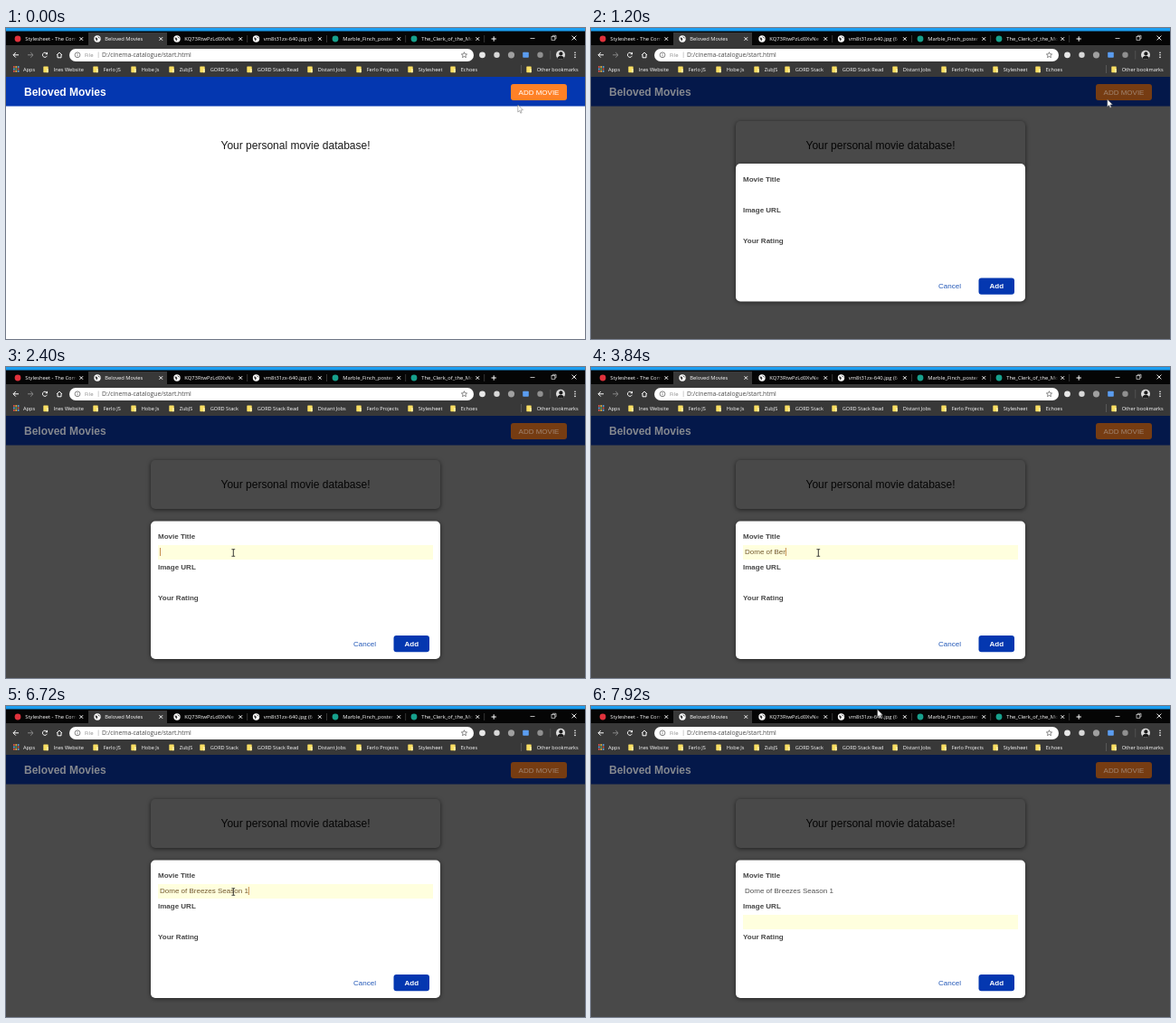
Write an HTML page with a canvas that moves like this. It is 640 px wide and 344 px high and loops after 8000 ms.

```html
<!DOCTYPE html>
<html lang="en">
<head>
<meta charset="utf-8">
<title>Beloved Movies</title>
<style>
  html, body { margin: 0; width: 100%; height: 100%; overflow: hidden; background: #fff; }
  canvas { display: block; width: 100vw; height: 100vh; }
</style>
</head>
<body>
<canvas id="stage" width="640" height="344"></canvas>
<script>
const ctx = document.getElementById('stage').getContext('2d');
const LOOP = 8000, STEP = 80;
const SANS = '"Liberation Sans", Arial, sans-serif';
const UI = '"Open Sans", "Noto Sans", sans-serif';
const CHROME = '#383838';

const MODAL_AT = 1200, FOCUS_AT = 2000, NEXT_FIELD_AT = 7120;

// "<" is the backspace key
const KEYS = 'Dome of Berzee<<<<<reezes Season 1';
const KEY_TIMES = [
  2640, 2800, 2880, 3040, 3120, 3200, 3360, 3440,
  3600, 3680, 3840, 3920, 4080, 4160,
  4400, 4560, 4720, 4720, 4800,
  4960, 5040, 5120, 5200, 5280, 5520, 5600, 5840,
  6080, 6160, 6240, 6400, 6480, 6560, 6720
];

const TABS = [
  [13, 'Stylesheet - The Com', '#e0323c'],
  [101, 'Beloved Movies', 'globe'],
  [189, 'KQ73RtwPzLd0XvNe', 'globe'],
  [276.5, 'vm8t31zx-640.jpg (6', 'globe'],
  [364, 'Marble_Finch_poster', '#17a08c'],
  [451, 'The_Clerk_of_the_Moor', '#17a08c']
];

const BOOKMARKS = [
  [44, 'Ines Website'], [99, 'Ferlo JS'], [141, 'Hobe Js'], [183, 'ZubJS'],
  [217, 'GORD Stack'], [269, 'GORD Stack Read'], [336, 'Distant Jobs'],
  [390, 'Ferlo Projects'], [447, 'Stylesheet'], [494, 'Echoes'],
  [578, 'Other bookmarks']
];

const clamp = v => Math.max(0, Math.min(1, v));
const progress = (t, a, b) => clamp((t - a) / (b - a));
const smooth = p => p * p * (3 - 2 * p);
const mix = (a, b, p) => a + (b - a) * p;

function rect(x, y, w, h, color) {
  ctx.fillStyle = color;
  ctx.fillRect(x, y, w, h);
}

function box(x, y, w, h, r, color) {
  ctx.fillStyle = color;
  ctx.beginPath();
  ctx.roundRect(x, y, w, h, r);
  ctx.fill();
}

function disc(x, y, r, color) {
  ctx.fillStyle = color;
  ctx.beginPath();
  ctx.arc(x, y, r, 0, 7);
  ctx.fill();
}

function trace(points, closed) {
  ctx.beginPath();
  points.forEach(([x, y]) => ctx.lineTo(x, y));
  if (closed) ctx.closePath();
}

function line(points, color, width = 1) {
  trace(points);
  ctx.strokeStyle = color;
  ctx.lineWidth = width;
  ctx.stroke();
}

function ring(x, y, r, color, from = 0, to = 7) {
  ctx.beginPath();
  ctx.arc(x, y, r, from, to);
  ctx.strokeStyle = color;
  ctx.lineWidth = 0.9;
  ctx.stroke();
}

function text(str, x, y, font, color, align = 'left') {
  ctx.font = font;
  ctx.fillStyle = color;
  ctx.textAlign = align;
  ctx.fillText(str, x, y);
}

function shadowed(color, blur, draw) {
  ctx.save();
  ctx.shadowColor = color;
  ctx.shadowBlur = blur;
  ctx.shadowOffsetY = 1;
  draw();
  ctx.restore();
}

function cross(x, y, r, color, width) {
  line([[x - r, y - r], [x + r, y + r]], color, width);
  line([[x + r, y - r], [x - r, y + r]], color, width);
}

function globe(x, y) {
  disc(x, y, 3.7, '#fff');
  trace([[x - 2.6, y - 1.6], [x - 0.4, y - 1.2], [x + 0.4, y + 0.6], [x - 0.8, y + 2.6], [x - 1.8, y + 0.6]], true);
  ctx.fillStyle = CHROME;
  ctx.fill();
  line([[x + 0.8, y - 2.4], [x + 2.6, y - 0.6]], CHROME);
}

function folder(x, y) {
  box(x - 2.7, y - 3.4, 5.4, 6.8, 0.6, '#f9de62');
  rect(x + 1, y - 0.6, 1.7, 4, '#fff0a6');
}

function drawTabs() {
  rect(0, 0, 640, 19, '#050505');
  rect(0, 0, 640, 3.5, '#1b9df0');
  rect(91, 5, 87, 14, CHROME);
  TABS.forEach(([x, label, icon], i) => {
    if (icon === 'globe') globe(x, 12);
    else disc(x, 12, 3.4, icon);
    const left = x + 8.3;
    const fade = ctx.createLinearGradient(left + 50, 0, left + 57, 0);
    fade.addColorStop(0, '#fff');
    fade.addColorStop(1, 'rgba(255,255,255,0)');
    text(label, left, 14.1, '500 5.8px ' + UI, fade);
    cross(x + 70.3, 12, 1.8, '#f2f2f2', 1);
    if (i > 1) rect(x + 77.5, 8, 0.6, 8, '#555');
  });
  rect(536.5, 11.5, 5.4, 1, '#fff');
  rect(538.7, 9.3, 1, 5.4, '#fff');
  rect(579.5, 11, 5, 0.8, '#ddd');
  ctx.strokeStyle = '#ddd';
  ctx.lineWidth = 0.7;
  ctx.strokeRect(603, 9.5, 3.8, 3.8);
  line([[604.3, 9.3], [604.3, 8.3], [608, 8.3], [608, 12], [607, 12]], '#ddd', 0.7);
  cross(628, 11, 2.4, '#fff', 0.9);
}

function drawToolbar() {
  rect(0, 19, 640, 35, CHROME);
  line([[14, 29.8], [8, 29.8]], '#fff');
  line([[10.8, 27], [8, 29.8], [10.8, 32.6]], '#fff');
  line([[24, 29.8], [30, 29.8]], '#868686');
  line([[27.2, 27], [30, 29.8], [27.2, 32.6]], '#868686');
  ring(43, 29.8, 2.6, '#fff', 0.4, 5.6);
  trace([[43.2, 29.2], [46, 29.2], [46, 26.6]], true);
  ctx.fillStyle = '#fff';
  ctx.fill();
  line([[56, 30], [59, 27.1], [62, 30]], '#fff');
  line([[57, 29.6], [57, 32.8], [61, 32.8], [61, 29.6]], '#fff');

  box(70, 23, 447, 14, 7, '#fff');
  ring(79, 29.8, 2.9, '#777');
  rect(78.6, 29.4, 0.8, 2, '#777');
  rect(78.6, 28, 0.8, 0.8, '#777');
  text('File', 87, 32, '6px ' + UI, '#8a8a8a');
  rect(101.8, 26.5, 0.6, 6.5, '#aaa');
  text('D:/cinema-catalogue/start.html', 106, 32, '6.8px ' + UI, '#4a4a4a');

  const star = Array.from({ length: 10 }, (_, i) => {
    const a = i * Math.PI / 5 - Math.PI / 2, r = i % 2 ? 1.5 : 3.3;
    return [506.5 + r * Math.cos(a), 30 + r * Math.sin(a)];
  });
  trace(star, true);
  ctx.strokeStyle = '#555';
  ctx.lineWidth = 0.7;
  ctx.stroke();

  disc(526.5, 29.8, 3.4, '#e8e8e8');
  disc(542.5, 29.8, 3.2, '#d8d8d8');
  disc(558.5, 29.8, 3.6, '#a0a0a0');
  box(571.2, 26.8, 6.6, 6, 0.8, '#5b9df0');
  disc(590.5, 29.8, 3.2, '#909090');
  rect(601.5, 25, 0.7, 9.5, '#5c5c5c');
  drawAvatar();
  [27.2, 29.8, 32.4].forEach(y => disc(629, y, 0.8, '#fff'));
}

function drawAvatar() {
  ctx.save();
  ctx.beginPath();
  ctx.arc(613, 29.8, 5, 0, 7);
  ctx.clip();
  rect(608, 24, 10, 12, '#dcdcdc');
  disc(613.4, 28.4, 2.1, '#1c1c1c');
  disc(613.2, 35, 4.2, '#1c1c1c');
  ctx.restore();
}

function drawBookmarks() {
  const colors = ['#e8554a', '#f3b63f', '#5aa8e8', '#62b567'];
  for (let i = 0; i < 9; i++) {
    const col = i % 3, row = (i - col) / 3;
    rect(8 + col * 2.4, 42.2 + row * 2.4, 1.7, 1.7, colors[(col + row * 2) % 4]);
  }
  const font = '500 5.6px ' + UI;
  text('Apps', 19, 47.9, font, '#fff');
  BOOKMARKS.forEach(([x, label]) => {
    folder(x, 45.8);
    text(label, x + 8.7, 47.9, font, '#fff');
  });
  rect(569, 41, 0.7, 9, '#666');
}

function drawPage(dim, hover) {
  const page = dim ? '#494949' : '#fff';
  rect(0, 54, 640, 290, page);
  rect(0, 54, 640, 32.5, dim ? '#04184a' : '#0437b0');
  text('Beloved Movies', 20, 75.2, 'bold 12px ' + SANS, dim ? '#85888f' : '#fff');

  const [fill, ink] = dim ? ['#763c12', '#a08470'] : hover ? ['#fff055', '#b8791c'] : ['#ff8126', '#fff'];
  box(558, 62, 62, 18, 3, fill);
  text('ADD MOVIE', 589, 74, '8px ' + SANS, ink, 'center');

  if (dim) shadowed('rgba(0,0,0,.6)', 5, () => box(160, 103, 320, 54, 5, page));
  text('Your personal movie database!', 320, 134.4, '12px ' + SANS, dim ? '#050505' : '#1a1a1a', 'center');
}

function typedText(t) {
  let out = '';
  KEY_TIMES.forEach((at, i) => {
    if (t < at) return;
    out = KEYS[i] === '<' ? out.slice(0, -1) : out + KEYS[i];
  });
  return out;
}

function drawModal(t) {
  const p = progress(t, 1105, 1405);
  const top = 170.5 - 40 * Math.pow(1 - p, 1.75);
  const focus = t < FOCUS_AT ? -1 : t < NEXT_FIELD_AT ? 0 : 1;
  const value = typedText(t);

  shadowed('rgba(0,0,0,.5)', 5, () => box(160, top, 320, 152.5, 5, '#fff'));
  if (focus >= 0) rect(168, top + 26.5 + focus * 34, 304, 16, '#ffffde');
  ['Movie Title', 'Image URL', 'Your Rating'].forEach((label, i) =>
    text(label, 168, top + 19.6 + i * 34, 'bold 8px ' + SANS, '#464646'));
  text(value, 170, top + 36.8, '8px ' + SANS, focus ? '#505050' : '#73592f');

  const caretOn = focus === 0 ? t < 2480 || t >= KEY_TIMES[0] : focus === 1 && t < 7520;
  if (caretOn) {
    const x = 170 + (focus ? 0 : ctx.measureText(value).width);
    rect(x, top + 29.5 + focus * 34, 0.9, 9, '#c08440');
  }

  text('Cancel', 384, top + 138.4, '8px ' + SANS, '#2459b8');
  box(428.5, top + 126.5, 39.5, 18.3, 3, '#0437b0');
  text('Add', 448.3, top + 138.4, 'bold 8px ' + SANS, '#fff', 'center');
}

function pointerAt(t) {
  if (t < 560) {
    const p = progress(t, 0, 240);
    return [mix(565.8, 567.5, p), mix(85, 81, p)];
  }
  if (t < 1280) {
    const p = smooth(progress(t, 480, 800));
    return [mix(567.5, 570.8, p), mix(81, 79, p)];
  }
  if (t < 7400) {
    const p = smooth(progress(t, 1200, 1840));
    return [mix(570.8, 251.3, p), mix(79, 205.5, p)];
  }
  const p = smooth(progress(t, 7360, 7920)), q = 1 - p;
  return [
    q * q * 251.3 + 2 * p * q * 340 + p * p * 316.7,
    q * q * 205.5 + 2 * p * q * 90 + p * p * 4
  ];
}

function drawPointer(t) {
  const [x, y] = pointerAt(t);
  const overField = t >= MODAL_AT && x > 168 && x < 472 &&
    [197, 231, 265].some(top => y >= top && y <= top + 16);
  if (overField) {
    line([[x, y - 3.8], [x, y + 3.8]], '#222', 0.9);
    line([[x - 1.9, y - 3.8], [x + 1.9, y - 3.8]], '#222', 0.8);
    line([[x - 1.9, y + 3.8], [x + 1.9, y + 3.8]], '#222', 0.8);
    return;
  }
  const shape = [[0, 0], [0, 8], [1.8, 6.4], [3, 9.2], [4.3, 8.6], [3.1, 5.9], [5.6, 5.7]];
  trace(shape.map(([dx, dy]) => [x + dx, y + dy]), true);
  ctx.fillStyle = '#fff';
  ctx.fill();
  ctx.strokeStyle = '#666';
  ctx.lineWidth = 0.5;
  ctx.stroke();
}

function frame() {
  const t = Math.floor(performance.now() % LOOP / STEP) * STEP;
  const open = t >= MODAL_AT;
  drawPage(open, t >= 640);
  if (open) drawModal(t);
  drawTabs();
  drawToolbar();
  drawBookmarks();
  drawPointer(t);
  requestAnimationFrame(frame);
}
frame();
</script>
</body>
</html>
```
